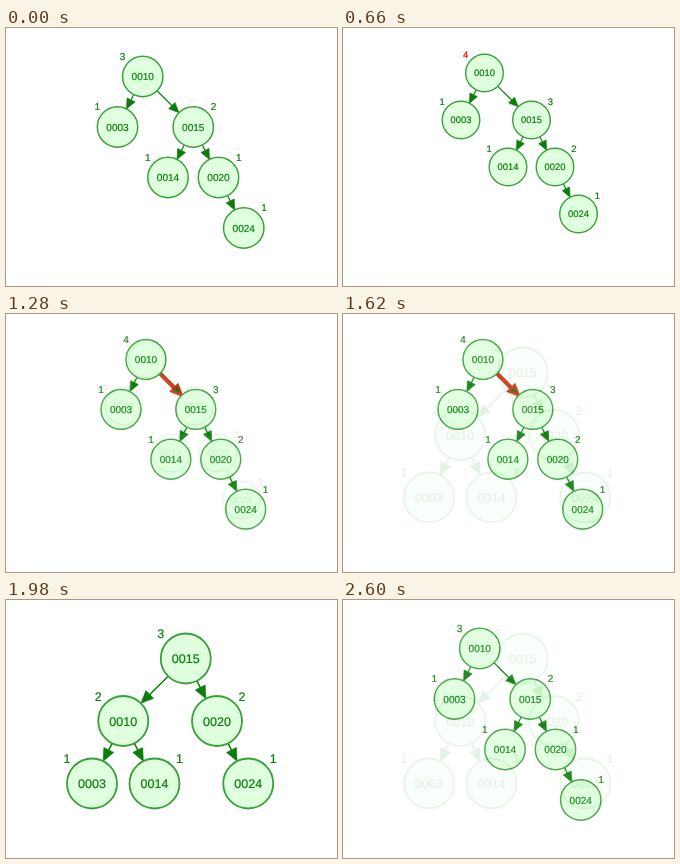
Recreate the animation shown at these times as an HTML page. Size 331 px wide and 258 px high, loop 2.64 s.

```html
<!DOCTYPE html>
<html lang="en">
<head>
<meta charset="utf-8">
<title>Tree rotation</title>
<style>
  html, body { margin: 0; width: 100%; height: 100%; overflow: hidden; background: #fff; }
  svg { display: block; width: 331px; height: 258px; }
  text {
    font-family: Arial, "Liberation Sans", sans-serif;
    text-anchor: middle;
    text-rendering: geometricPrecision;
    stroke-width: 0.2px;
  }
</style>
</head>
<body>
<svg id="stage" viewBox="0 0 331 258"></svg>
<script>
const GREEN = '#0a7d0a', RING = '#38a038', RED = '#d03010';
const KEYS = ['0003', '0010', '0014', '0015', '0020', '0024'];
const stage = document.getElementById('stage');

// Trees are [key index, height, left subtree, right subtree].
const chain = (root, middle, lower) =>
  [1, root, [0, 1], [3, middle, [2, 1], [4, lower, null, [5, 1]]]];
const unbalanced = chain(4, 3, 2);
const balanced = [3, 3, [1, 2, [0, 1], [2, 1]], [4, 2, null, [5, 1]]];

// x is the centre of the smallest key, y that of the root.
const scenes = [
  { x: 111.5, y: 48.5, r: 20.2, tree: chain(3, 2, 1) },
  { x: 118, y: 45, r: 18.8, tree: unbalanced, alert: true },
  { x: 115, y: 45.5, r: 19.95, tree: unbalanced, heavy: true },
  { x: 86, y: 58.5, r: 25, tree: balanced }
];

function add(parent, tag, attrs, content) {
  const node = document.createElementNS('http://www.w3.org/2000/svg', tag);
  for (const name in attrs) node.setAttribute(name, attrs[name]);
  if (content !== undefined) node.textContent = content;
  return parent.appendChild(node);
}

function label(parent, x, y, size, color, content) {
  add(parent, 'text', {
    x, y: y + size * 0.36, 'font-size': size, fill: color, stroke: color
  }, content);
}

function arrow(parent, a, b, r, heavy) {
  const dx = b.x - a.x, dy = b.y - a.y, length = Math.hypot(dx, dy);
  const angle = Math.atan2(dy, dx) * 180 / Math.PI;
  const g = add(parent, 'g', { transform: `translate(${a.x} ${a.y}) rotate(${angle})` });
  const tip = length - r, back = tip - r * 0.5, half = r * 0.22;
  add(g, 'path', {
    d: `M${r} 0H${back + 1}`, stroke: heavy ? RED : GREEN, 'stroke-width': heavy ? 4.2 : r * 0.06
  });
  add(g, 'path', {
    d: `M${tip} 0L${back} ${-half}V${half}Z`, fill: GREEN,
    stroke: heavy ? RED : GREEN, 'stroke-width': heavy ? 2.6 : 0.6
  });
}

function buildScene({ x, y, r, tree, alert, heavy }) {
  const g = add(stage, 'g', {});
  add(g, 'rect', { width: 331, height: 258, fill: '#fff' });
  const edges = add(g, 'g', {}), nodes = add(g, 'g', {});

  function place([key, height, left, right], depth, side) {
    const p = { x: x + key * r * 1.25, y: y + depth * r * 2.5 };
    if (left) arrow(edges, p, place(left, depth + 1, -1), r);
    if (right) arrow(edges, p, place(right, depth + 1, 1), r, heavy && !depth);
    add(nodes, 'circle', {
      cx: p.x, cy: p.y, r, fill: '#dfffdf', stroke: RING, 'stroke-width': r * 0.072
    });
    label(nodes, p.x, p.y, r / 2, GREEN, KEYS[key]);
    label(nodes, p.x + side * r, p.y - r, r / 2, alert && !depth ? '#f00' : GREEN, height);
    return p;
  }
  place(tree, 0, -1);
  return g;
}

const layers = scenes.map(buildScene);
const HOLD = 300, STEP = 40, STEPS = 10, PHASE = 660;

function render(time) {
  const t = time % (PHASE * scenes.length);
  const current = Math.floor(t / PHASE);
  const next = (current + 1) % scenes.length;
  const local = t - current * PHASE;
  const mix = local < HOLD ? 0 : Math.min(1, (Math.floor((local - HOLD) / STEP) + 1) / STEPS);
  // The later layer sits on top, so its opacity alone sets the blend.
  const top = Math.max(current, next);
  layers.forEach((layer, i) => {
    layer.style.display = i === current || i === next ? '' : 'none';
    layer.style.opacity = i !== top ? 1 : i === next ? mix : 1 - mix;
  });
}

const start = performance.now();
function tick() {
  render(performance.now() - start);
  requestAnimationFrame(tick);
}
tick();
</script>
</body>
</html>
```
